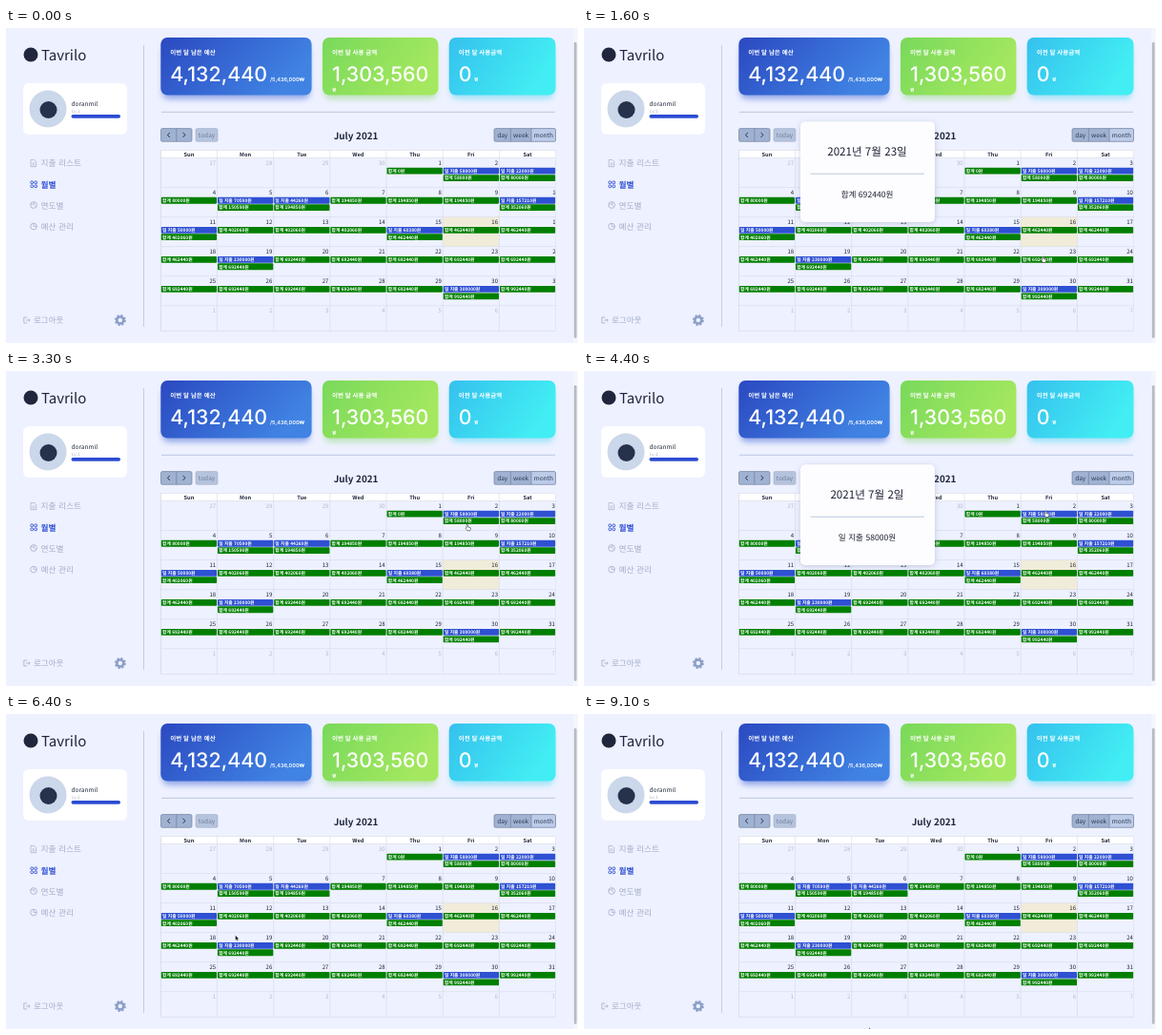
These frames come from a looping animation (600x331 px, 9.2 s). An HTML page:

```html
<!DOCTYPE html>
<html lang="ko">
<head>
<meta charset="utf-8">
<title>Budget calendar</title>
<style>
  html, body { margin: 0; width: 100%; height: 100%; overflow: hidden; background: #eef1ff; }
  svg { display: block; width: 600px; height: 331px; }
  text {
    font-family: "Noto Sans CJK KR", "Noto Sans CJK", "Noto Sans", sans-serif;
    text-rendering: geometricPrecision;
    white-space: pre;
  }
  .num { font-family: Inter, sans-serif; }
</style>
</head>
<body>
<svg id="stage" viewBox="0 0 600 331">
  <defs>
    <linearGradient id="blue" x2="1" y2=".35"><stop stop-color="#2b49c1"/><stop offset="1" stop-color="#4083e3"/></linearGradient>
    <linearGradient id="green" x2="1" y2=".35"><stop stop-color="#79d95b"/><stop offset="1" stop-color="#a4e85f"/></linearGradient>
    <linearGradient id="cyan" x2="1" y2=".35"><stop stop-color="#35c1ee"/><stop offset="1" stop-color="#42eef3"/></linearGradient>
    <filter id="blur" x="-20%" y="-40%" width="140%" height="180%"><feGaussianBlur stdDeviation="3.2"/></filter>
    <clipPath id="table"><rect x="162" y="127" width="414.7" height="193"/></clipPath>
  </defs>
</svg>
<script>
const LOOP = 9200;
const NS = "http://www.w3.org/2000/svg";
const stage = document.getElementById("stage");

function el(name, attrs, parent = stage) {
  const node = document.createElementNS(NS, name);
  for (const key in attrs) node.setAttribute(key, attrs[key]);
  return parent.appendChild(node);
}
function rect(x, y, width, height, fill, more, parent) {
  return el("rect", { x, y, width, height, fill, ...more }, parent);
}
function text(str, x, y, size, fill, more, parent) {
  const node = el("text", { x, y, "font-size": size, fill, ...more }, parent);
  node.textContent = str;
  return node;
}
function path(d, stroke, width = 0.7, more, parent) {
  return el("path", { d, stroke, "stroke-width": width, fill: "none", ...more }, parent);
}
const middle = { "text-anchor": "middle" };
const bold = { "font-weight": 700 };
const medium = { "font-weight": 500 };

function drawSidebar() {
  const soft = "#a2adc8", active = "#2f50d3";

  el("circle", { cx: 26, cy: 28, r: 7.5, fill: "#20263c" });
  text("Tavrilo", 37, 33.5, 15, "#20263c", { "font-weight": 300 });

  rect(18, 58, 109, 54, "#fff", { rx: 6 });
  el("circle", { cx: 44, cy: 85, r: 19.5, fill: "#cbd7ea" });
  el("circle", { cx: 44.5, cy: 86, r: 9, fill: "#26324c" });
  text("doranmil", 68.5, 81.8, 6.5, "#22283c", medium);
  text("Lv.1", 69, 89, 4.6, "#a9b1c4");
  rect(68.5, 91, 51.5, 3.7, "#2b4bd2", { rx: 1.8 });

  path("M144.5 18V314", "#c3cadc", 0.9);
  path("M163 88.3H576", "#b5c1de", 0.9);

  const items = [["지출 리스트", 145.3], ["월별", 167.5], ["연도별", 189.8], ["예산 관리", 212]];
  items.forEach(([label, y], i) =>
    text(label, 36.6, y, 8.7, i === 1 ? active : soft, i === 1 ? bold : medium));
  text("로그아웃", 29, 310.2, 8.5, soft, medium);

  path("M26 138.5h3.6l2 2v5.2h-5.6zM27.4 142h2.8M27.4 143.8h2.8", soft);
  for (const x of [25.9, 29.9])
    for (const y of [161, 165])
      rect(x, y, 2.6, 2.6, "none", { rx: 0.7, stroke: active, "stroke-width": 0.9 });
  el("circle", { cx: 29, cy: 186, r: 3.4, fill: "none", stroke: soft, "stroke-width": 0.8 });
  path("M26 185h3l2 2.5M29 185l1.5-2", soft);
  el("circle", { cx: 29, cy: 208.5, r: 3.3, fill: "none", stroke: soft, "stroke-width": 0.8 });
  path("M29 205.2v3.3h3.3", soft);
  path("M22 304h-3.2v6H22M21 307h4M23.6 305.4L25.2 307l-1.6 1.6", soft, 0.8);

  el("circle", { cx: 119.8, cy: 307, r: 3.5, fill: "none", stroke: "#8c9fc7", "stroke-width": 2.6 });
  el("circle", { cx: 119.8, cy: 307, r: 5.1, fill: "none", stroke: "#8c9fc7",
    "stroke-width": 1.8, "stroke-dasharray": "2.1 1.905" });
}

function drawCard(x, width, fill, shade, label, amount) {
  rect(x + 2, 18, width - 4, 56.5, shade, { rx: 6, filter: "url(#blur)", opacity: 0.65 });
  rect(x, 10, width, 60.5, `url(#${fill})`, { rx: 7 });
  text(label, x + 10, 28, 6.5, "#fff", bold);
  text(amount, x + 10, 55.6, 21.4, "#fff", { class: "num", "font-weight": 500 });
}
function drawCards() {
  drawCard(162.3, 158.3, "blue", "#5b7bd8", "이번 달 남은 예산", "4,132,440");
  drawCard(332, 121.4, "green", "#9fdc90", "이번 달 사용 금액", "1,303,560");
  drawCard(464.7, 111.8, "cyan", "#6fd9f3", "이전 달 사용금액", "0");
  text("/5,436,000₩", 277, 55.8, 5.6, "#fff", { class: "num", "font-weight": 600 });
  text("₩", 342.4, 66.5, 5.8, "#fff", bold);
  text("₩", 491.6, 55.8, 5.8, "#fff", bold);
}

function drawToolbar() {
  const top = 105.6, height = 13.7;
  const edge = { stroke: "#66768f", "stroke-width": 0.6 };
  const dark = "#9fb2d2", ink = "#2c3a52";
  const label = { ...middle, ...medium };
  rect(162.5, top, 32.5, height, dark, { rx: 1.5, ...edge });
  path(`M178.8 ${top}v${height}`, "#66768f", 0.6);
  path("M171.8 110l-2.4 2.4 2.4 2.4M185.6 110l2.4 2.4-2.4 2.4", "#1d2b46", 1);
  rect(199, top, 23, height, "#b5c3dd", { rx: 1.5, stroke: "#a2afc6", "stroke-width": 0.6 });
  text("today", 210.5, 114.8, 6.5, "#6f7e99", label);
  rect(512, top, 64.5, height, dark, { rx: 1.5 });
  rect(551, top, 25.5, height, "#bccbe8", { rx: 1.5 });
  rect(512, top, 64.5, height, "none", { rx: 1.5, ...edge });
  path(`M529.3 ${top}v${height}M551 ${top}v${height}`, "#66768f", 0.6);
  text("day", 520.7, 114.8, 6.5, ink, label);
  text("week", 540.1, 114.8, 6.5, ink, label);
  text("month", 563.8, 114.8, 6.5, ink, label);
  text("July 2021", 367, 117, 9.9, "#1f273c", { ...middle, ...bold });
}

// Calendar: totals accumulate from the daily spending
const LEFT = 162.3, RIGHT = 576.6, TOP = 136.5, BOTTOM = 318.5;
const COL = (RIGHT - LEFT) / 7, ROW = 31.05;
const spent = { 2: 58000, 3: 22000, 5: 70590, 6: 44260, 10: 157210, 11: 50000,
  15: 60380, 19: 230000, 30: 300000 };
const saturday = [];
const grid = el("g", { "clip-path": "url(#table)" });

function drawBar(x, y, fill, label) {
  rect(x + 0.5, y, COL - 0.9, 6.8, fill, { rx: 0.8 }, grid);
  text(label, x + 1.7, y + 5.2, 4.8, "#fff", bold, grid);
}
function drawCalendar() {
  const line = "#d5dae6";
  rect(LEFT, 128.3, RIGHT - LEFT, TOP - 128.3, "#fff", {}, grid);
  rect(LEFT + COL * 5, TOP + ROW * 2, COL, ROW, "#f1ecd9", {}, grid);
  for (let i = 0; i < 7; i++) path(`M${LEFT + COL * i} 128.3V${BOTTOM}`, line, 0.6, {}, grid);
  for (let r = 0; r < 6; r++) path(`M${LEFT} ${TOP + ROW * r}H${RIGHT}`, line, 0.6, {}, grid);
  rect(LEFT, 128.3, RIGHT - LEFT, BOTTOM - 128.3, "none", { stroke: line, "stroke-width": 0.6 }, grid);
  ["Sun", "Mon", "Tue", "Wed", "Thu", "Fri", "Sat"].forEach((name, i) =>
    text(name, LEFT + COL * (i + 0.5), 134.8, 5.7, "#1f273c", { ...middle, ...bold }, grid));

  let total = 0;
  for (let cell = 0; cell < 42; cell++) {
    const col = cell % 7, row = Math.floor(cell / 7);
    const x = LEFT + COL * col, y = TOP + ROW * row;
    const day = cell - 3;
    const inMonth = day >= 1 && day <= 31;
    const shown = day < 1 ? day + 30 : day > 31 ? day - 31 : day;
    const label = text(shown, x + COL - 1.4, y + 7.7, 6,
      inMonth ? "#1a2031" : "#b4bac8", { "text-anchor": "end" }, grid);
    if (col === 6) saturday.push(label);
    if (!inMonth) continue;
    let barY = y + 10.3;
    if (spent[day]) {
      total += spent[day];
      drawBar(x, barY, "#2e50d2", `일 지출 ${spent[day]}원`);
      barY += 7.4;
    }
    drawBar(x, barY, "#007f00", `합계 ${total}원`);
  }
}

drawSidebar();
drawCards();
drawToolbar();
drawCalendar();
rect(595, 0, 5, 331, "#f5f6fb");
rect(595.8, 15, 2.8, 311, "#b8bbc4", { rx: 1.4 });

const modal = el("g", {});
rect(227.5, 100, 140.5, 105, "#7787a8", { rx: 5, filter: "url(#blur)", opacity: 0.4 }, modal);
rect(227, 98.3, 141, 105.7, "#fdfdff", { rx: 5 }, modal);
path("M237.5 153.2H357", "#b9cbdc", 1, {}, modal);
const modalDate = text("", 297, 134, 11.6, "#1d2233", { ...middle, ...medium }, modal);
const modalBody = text("", 297, 178.3, 8.6, "#1d2233", { ...middle, ...medium }, modal);

const arrow = path("M0 0V5.4L1.3 4.2 2.2 6.1 3 5.7 2.2 3.9H3.8Z", "#fff", 0.4, { fill: "#000" });
const hand = path("M1.2 0Q2 0 2 .8V2.6L4.6 3.2Q5 3.4 4.9 4.2L4.2 6.4H1.4L-.4 4Q-.3 3.2.5 3.7V.8Q.5 0 1.2 0Z",
  "#111", 0.5, { fill: "#fff" });

// time, x, y, over an event
const pointer = [
  [0, 420, 336, 0], [300, 425, 322, 0], [900, 490, 240, 1], [1100, 490, 240, 1], [1500, 480, 240, 1],
  [2700, 480, 240, 1], [3500, 483, 147, 1], [5500, 483, 147, 0], [6400, 240.6, 232.6, 0],
  [6750, 243, 241, 1], [7050, 243, 241, 0], [7600, 331, 194, 0], [8100, 385, 225, 0],
  [8450, 385, 225, 0], [9100, 299, 329.5, 0], [9200, 299, 329.5, 0]
];
const modals = [
  { from: 1400, to: 2700, day: 23, body: "합계 692440원" },
  { from: 3700, to: 5400, day: 2, body: "일 지출 58000원" },
  { from: 7000, to: 8400, day: 19, body: "일 지출 230000원" }
];
const show = (node, on) => node.setAttribute("display", on ? "inline" : "none");

function pointerAt(t) {
  let i = 0;
  while (i < pointer.length - 2 && t >= pointer[i + 1][0]) i++;
  const [t0, x0, y0, over] = pointer[i], [t1, x1, y1] = pointer[i + 1];
  const p = (t - t0) / (t1 - t0), k = p * p * (3 - 2 * p);
  return { x: x0 + (x1 - x0) * k, y: y0 + (y1 - y0) * k, over };
}
function render(t) {
  const open = modals.find(m => t >= m.from && t < m.to);
  show(modal, open);
  if (open) {
    modalDate.textContent = `2021년 7월 ${open.day}일`;
    modalBody.textContent = open.body;
  }
  // Saturday dates overflow the table until the first dialog opens
  const dateEnd = t < 1400 ? RIGHT + 3.2 : RIGHT - 0.7;
  saturday.forEach(label => label.setAttribute("x", dateEnd));

  const { x, y, over } = pointerAt(t);
  for (const node of [arrow, hand]) node.setAttribute("transform", `translate(${x} ${y})`);
  show(arrow, !over);
  show(hand, over);
}

const start = performance.now();
function tick() {
  render((performance.now() - start) % LOOP);
  requestAnimationFrame(tick);
}
tick();
</script>
</body>
</html>
```
